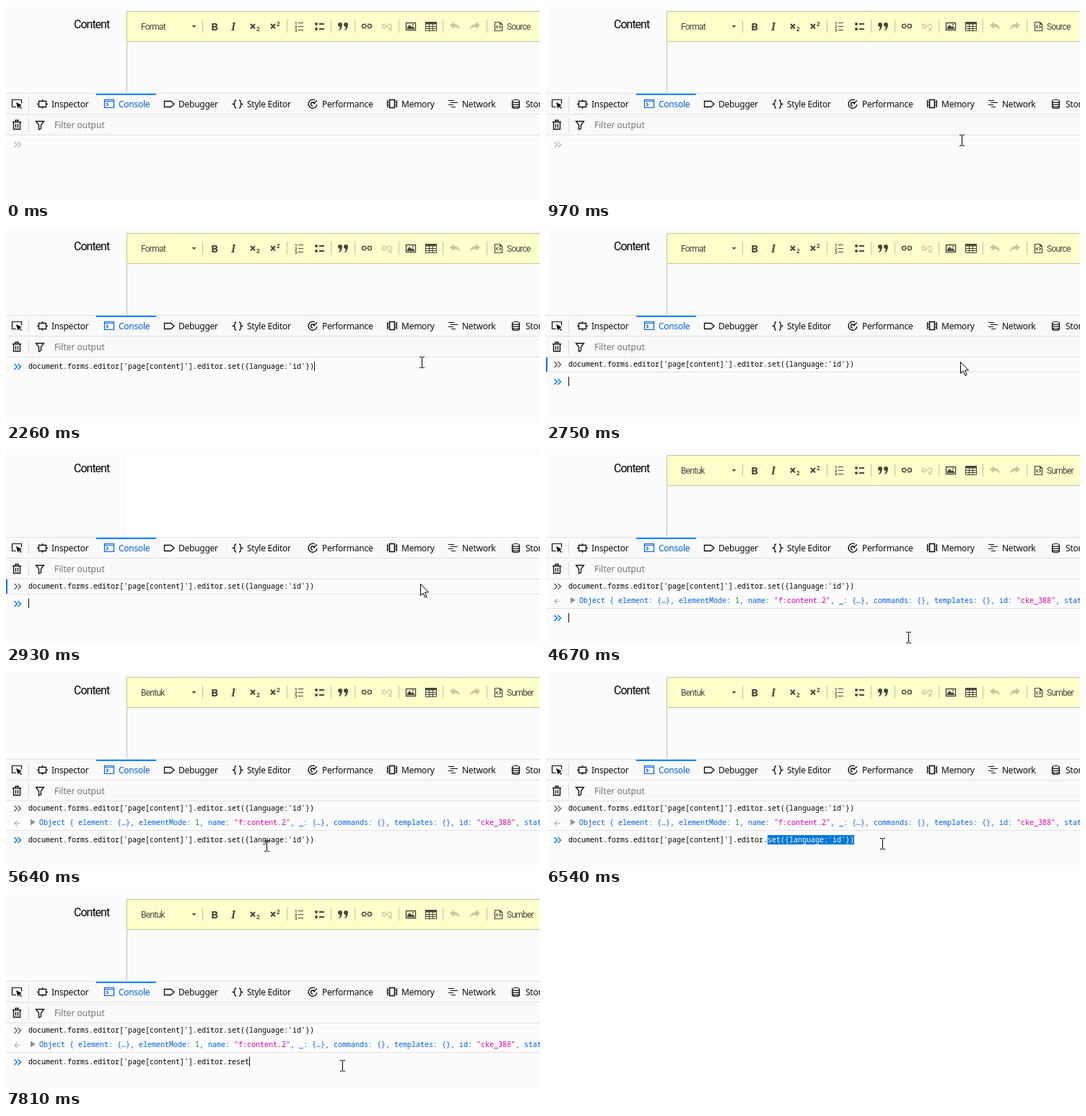
An HTML page with a canvas for the animation above (8000 ms loop, 740x270 px).

```html
<!DOCTYPE html>
<html lang="en">
<head>
<meta charset="utf-8">
<title>Editor language console</title>
<style>
html, body { margin: 0; width: 100%; height: 100%; overflow: hidden; background: #fcfcfc; }
canvas { display: block; }
</style>
</head>
<body>
<canvas id="stage" width="740" height="270"></canvas>
<script>
const ctx = document.getElementById('stage').getContext('2d');
const LOOP = 8000, TICK = 60, CHAR = 6, LEFT = 31;
const UI = '12px "Noto Sans", sans-serif';
const MONO = '10px "Noto Sans Mono", monospace';
const INK = '#0c0c0d', BLUE = '#0060df', BRIGHT = '#0a84ff', RULE = '#e0e0e2', ICON = '#474740';
const BASE = "document.forms.editor['page[content]'].editor.";
const CALL = "set({language:'id'})";
const RESULT = [
  ['Object { element: {…}, elementMode: ', BLUE], ['1', '#058b00'], [', name: ', BLUE],
  ['"f:content.2"', '#dd00a9'], [', _: {…}, commands: {}, templates: {}, id: ', BLUE],
  ['"cke_388"', '#dd00a9'], [', state: ', BLUE]
];

function rect(x, y, w, h, color) {
  ctx.fillStyle = color;
  ctx.fillRect(x, y, w, h);
}
function fill(d, color) {
  ctx.fillStyle = color;
  ctx.fill(new Path2D(d));
}
function line(d, color = INK, width = 1) {
  ctx.strokeStyle = color;
  ctx.lineWidth = width;
  ctx.stroke(new Path2D(d));
}
function text(s, x, y, font, color = INK, spacing = 0) {
  ctx.font = font;
  ctx.letterSpacing = spacing + 'px';
  ctx.fillStyle = color;
  ctx.fillText(s, x, y);
}
function mono(s, x, y, color = '#000') { text(s, x, y, MONO, color); }
const narrow = (s, x) => text(s, x, 33, '12px Roboto, sans-serif', ICON, -0.75);

function chevrons(y, color) {
  line(`M11.5 ${y - 4}l4 4l-4 4M16.5 ${y - 4}l4 4l-4 4`, color, 1.4);
}
function faded(alpha, draw) {
  ctx.globalAlpha = alpha;
  draw();
  ctx.globalAlpha = 1;
}

function basicIcons() {
  const sans = '"Open Sans", sans-serif';
  text('B', 284, 34, 'bold 15px ' + sans, ICON);
  text('I', 312, 34, 'italic bold 16px "Liberation Serif", serif', ICON);
  for (const [x, y] of [[338, 35], [366, 28]]) {
    line(`M${x + 1} 25l6 6.5m0 -6.5l-6 6.5`, ICON, 2);
    text('2', x + 9, y, 'bold 8px ' + sans, ICON);
  }
  for (let i = 0; i < 3; i++) {
    const y = 23 + i * 5;
    text(i + 1, 400, y + 2.5, 'bold 6px ' + sans, ICON);
    rect(405, y, 7, 1, ICON);
  }
  for (const y of [25, 32]) {
    fill(`M428 ${y}a2 2 0 1 0 4 0a2 2 0 1 0 -4 0`, ICON);
    rect(434, y - 1, 7, 2, ICON);
  }
  for (const x of [460, 468])
    fill(`M${x} 26a3 3 0 0 1 6 0q0 5 -4 8h-1q2 -3 2 -5q-3 0 -3 -3`, ICON);
  line('M499 25.5h-3a2.5 2.5 0 0 0 0 5h3M501 25.5h3a2.5 2.5 0 0 1 0 5h-3M497 28h6', ICON, 1.5);
  line('M554.5 23.5h13v10h-13z', ICON, 1.4);
  fill('M556 32v-2l3 -4l3 3l2 -1l2 3v1z', ICON);
  fill('M563 26a1 1 0 1 0 2 0a1 1 0 1 0 -2 0', ICON);
  line('M581.5 22.5h15v12h-15zM581.5 28.5h15M581.5 31.5h15M586.5 25v9M591.5 25v9', ICON);
  rect(581, 22, 16, 3.5, ICON);
}
function historyIcons() {
  line('M526 25.5h-2a2.5 2.5 0 0 0 0 5h3M529 25.5h3a2.5 2.5 0 0 1 2 4M525 28h5M530 30l4.5 4.5m0 -4.5l-4.5 4.5', ICON, 1.4);
  fill('M615 27l6 -5v3q7 0 8 8q-3 -4 -8 -4v3z', ICON);
  fill('M657 27l-6 -5v3q-7 0 -8 8q3 -4 8 -4v3z', ICON);
}

function editor(t) {
  text('Content', 94, 31, '16px Roboto, sans-serif', '#000', -1);
  if (t >= 2930 && t < 3110) return rect(167, 7, 573, 114, '#fff');
  const translated = t >= 3110, loading = translated && t < 3230;
  rect(167, 7, 573, 43, '#ffffcc');
  line('M740 7.5H167.5V121M167.5 49.5H740', '#c4c4a4');
  narrow(translated ? 'Bentuk' : 'Format', 187);
  fill('M257.5 27h6l-3 3z', ICON);
  for (const x of [272, 389, 450, 483, 544, 605, 666]) rect(x, 19, 1, 18, '#c2c2a4');
  faded(loading ? 0.3 : 1, basicIcons);
  faded(0.3, historyIcons);
  faded(loading ? 0.6 : 1, () => {
    line('M677.5 22.5h7l3 3v9h-10zM684.5 22.5v3h3', ICON, 1.2);
    line('M681.5 27l-2 2l2 2M683.5 27l2 2l-2 2', ICON, 1.2);
  });
  narrow(translated ? 'Sumber' : 'Source', 694);
}

function tools() {
  rect(0, 121, 740, 59, '#fafafa');
  for (const y of [121, 150, 179]) rect(0, y, 740, 1, RULE);
  rect(125, 122, 83, 2, BRIGHT);
  rect(31, 127, 1, 19, '#d7d7db');
  rect(31, 156, 1, 19, '#d7d7db');

  const tabs = { Inspector: 63, Console: 156, Debugger: 239, 'Style Editor': 334,
    Performance: 438, Memory: 548, Network: 632, Storage: 720 };
  for (const name in tabs)
    text(name, tabs[name], 141, UI, name === 'Console' ? BLUE : INK, -0.25);

  line('M14 140.5h-5.5v-10h13v5', INK, 1.2);
  fill('M14 134l8 4l-3 1l3 3l-1 1l-3 -3l-1.5 3z', INK);
  line('M45.5 132.5h10v8h-10zM50.5 130v2.5m0 8v2.5M43 136.5h2.5m10 0h2.5', INK, 1.3);
  line('M136.5 130.5h13v11h-13zM136.5 132.5h13M139 134.5l2.5 2.5l-2.5 2.5', BLUE, 1.2);
  line('M219.5 132.5h9l4.5 4l-4.5 4h-9z', INK, 1.3);
  line('M319 131q-2 0 -2 2v1.5q0 1.5 -2 2q2 .5 2 2v1.5q0 2 2 2M323 131q2 0 2 2v1.5q0 1.5 2 2q-2 .5 -2 2v1.5q0 2 -2 2', INK, 1.3);
  line('M428 131a6 6 0 1 0 3 6M427.5 136.5a2.5 2.5 0 1 0 -2.5 2.5M426 136l5 -4.5', INK, 1.3);
  line('M531.5 130.5h7v11h-7z', INK, 1.6);
  line('M528.5 131v2l1 1l-1 1v2l1 1l-1 1v2M541.5 131v2l-1 1l1 1v2l-1 1l1 1v2', INK, 1.3);
  line('M613 131.5h8M616 134.5h10M613 137.5h7M617 140.5h6', INK, 1.2);
  line('M701.5 132.5a5 2 0 1 0 10 0a5 2 0 1 0 -10 0v8a5 2 0 0 0 10 0v-8M701.5 135.5a5 2 0 0 0 10 0M701.5 138.5a5 2 0 0 0 10 0', INK, 1.2);

  line('M9 161.5h12M13 161v-2h4v2M10.5 162v9.5h9v-9.5M13.5 164v5.5M16.5 164v5.5', INK, 1.3);
  line('M41.5 160.5h11l-4 5v5l-3 1.5v-6.5z', INK, 1.3);
  text('Filter output', 67, 170, UI, '#737373');
}

// Typed replacement of the selected call
function typed(t) {
  const n = [7150, 7270, 7390, 7570, 7750].filter(k => t >= k).length;
  return BASE + 'reset'.slice(0, n);
}
const columnAt = x => LEFT + CHAR * Math.round((x - LEFT) / CHAR);

function caret(x, top) { rect(x, top, 1, 13, '#0c0c0d'); }

function output(t, mouse) {
  if (t < 2510) {
    chevrons(193, t < 1460 ? '#b8b8bb' : '#0074e8');
    if (t >= 2260) {
      mono(BASE + CALL, LEFT, 196);
      caret(427, 186);
    } else if (t >= 1460 && t < 2020) caret(LEFT, 186);
    return;
  }
  chevrons(190, '#5c5c61');
  mono(BASE + CALL, LEFT, 193);
  if (t >= 2750 && mouse[1] < 200) rect(0, 180, 2, 20, '#0074e8');
  if (t < 3110) {
    rect(0, 200, 740, 1, RULE);
    chevrons(214, '#0074e8');
    return caret(LEFT, 207);
  }

  line('M20 210.5h-8m3.5 -3.5l-3.5 3.5l3.5 3.5', '#b0b0b4', 1.2);
  fill('M34 204.5v9l7 -4.5z', '#939395');
  let x = 46;
  for (const [s, color] of RESULT) {
    mono(s, x, 213, color);
    x += s.length * CHAR;
  }
  rect(0, 220, 740, 1, RULE);
  chevrons(234, '#0074e8');
  prompt(t, mouse);
}

function prompt(t, mouse) {
  if (t < 5100) {
    if ((t >= 3610 && t < 4140) || t >= 4670) caret(LEFT, 227);
    return;
  }
  if (t >= 7030) {
    const s = typed(t);
    mono(s, LEFT, 237);
    return caret(LEFT + s.length * CHAR, 227);
  }
  const start = LEFT + BASE.length * CHAR;
  mono(BASE + CALL, LEFT, 237);
  if (t < 5630) caret(427, 227);
  if (t < 6120) return;
  const end = Math.min(427, columnAt(mouse[0]));
  if (end <= start) return caret(start, 227);
  rect(start, 227, end - start, 13, '#0078d7');
  mono(CALL.slice(0, (end - start) / CHAR), start, 237, '#fff');
  rect(end, 227, 427 - end, 13, '#fcfcfc');
  mono(CALL.slice((end - start) / CHAR), end, 237);
}

// Moves: start, end, from x, y, to x, y
const MOVES = [
  [430, 550, 694, 233, 633, 223],
  [730, 970, 630, 220, 576, 187],
  [2510, 2750, 576, 187, 574, 186],
  [3110, 3170, 574, 187, 573, 188],
  [3230, 3710, 573, 190, 571, 258],
  [3950, 4430, 569, 259, 502, 261],
  [5160, 5880, 498, 260, 313, 236],
  [5940, 5940, 312, 235, 312, 235],
  [6120, 6540, 314, 235, 466, 239]
];
function mouseAt(t) {
  const m = MOVES.findLast(k => t >= k[0]);
  if (!m) return null;
  const [a, b, x0, y0, x1, y1] = m;
  const u = b > a ? Math.min(1, Math.floor((t - a) / TICK) * TICK / (b - a)) : 1;
  const e = u * u * (3 - 2 * u);
  return [Math.round(x0 + (x1 - x0) * e), Math.round(y0 + (y1 - y0) * e)];
}
function pointer(t, [x, y]) {
  if (t >= 2630 && y < 221) {
    const d = `M${x + .5} ${y + .5}v16l3.5 -3.5l3 6.5l2 -1l-2.5 -6.5h5z`;
    fill(d, '#fff');
    line(d, '#000');
  } else {
    rect(x, y - 7, 1, 14, '#000');
    for (const k of [-8, 7]) {
      rect(x - 3, y + k, 3, 1, '#000');
      rect(x + 1, y + k, 3, 1, '#000');
    }
  }
}

function frame(now) {
  const t = now % LOOP, mouse = mouseAt(t);
  rect(0, 0, 740, 270, '#fcfcfc');
  editor(t);
  tools();
  output(t, mouse);
  if (mouse) pointer(t, mouse);
}
const begin = performance.now();
function tick() {
  frame(performance.now() - begin);
  requestAnimationFrame(tick);
}
tick();
</script>
</body>
</html>
```
